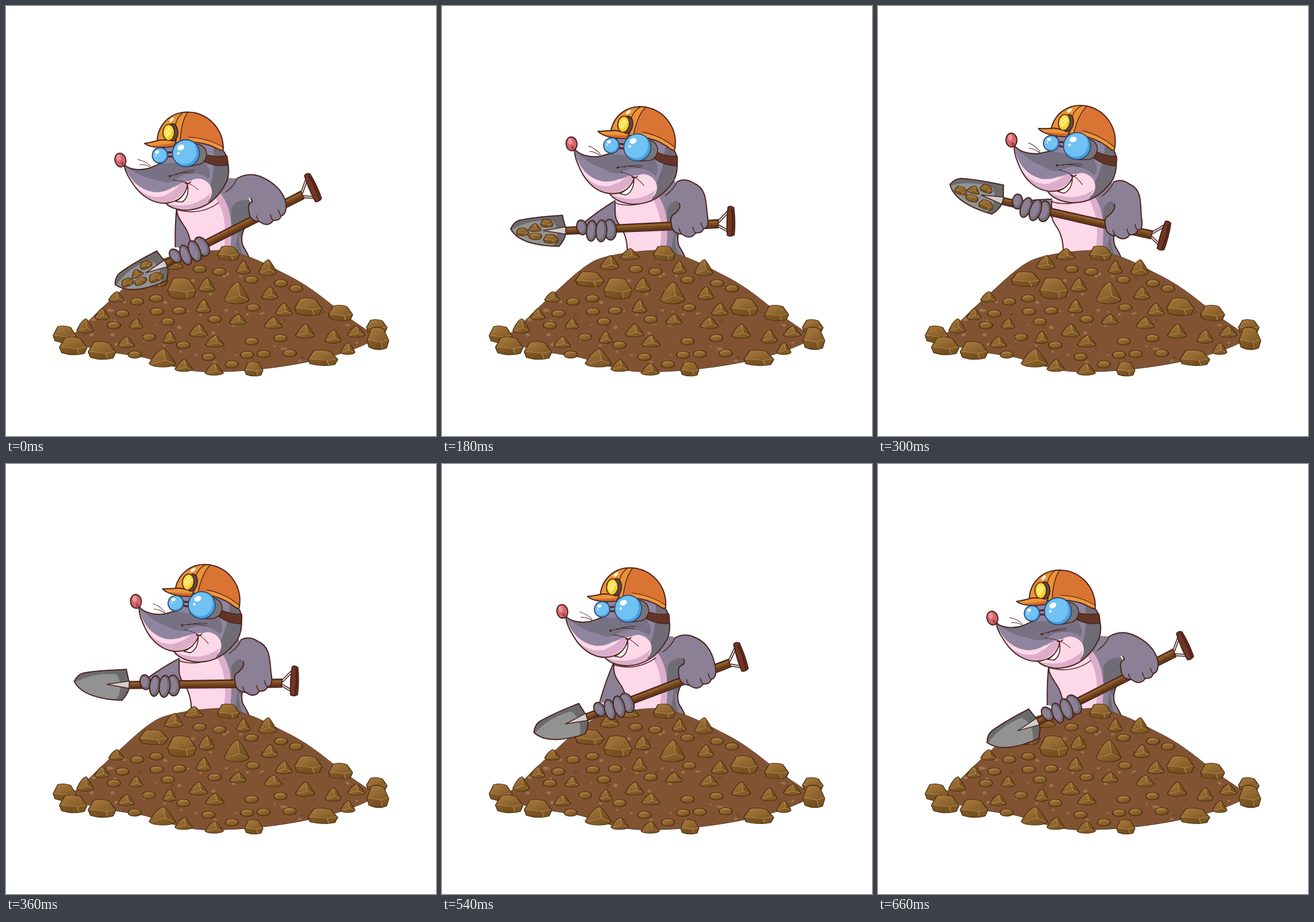
These frames come from a looping animation (748x748 px, 780 ms). An HTML page with a canvas:

```html
<!DOCTYPE html>
<html lang="en">
<head>
<meta charset="utf-8">
<title>Digging mole</title>
<style>
html, body { margin: 0; width: 100%; height: 100%; overflow: hidden; background: #fff; }
canvas { display: block; width: 748px; height: 748px; }
</style>
</head>
<body>
<canvas width="748" height="748"></canvas>
<script>
const ctx = document.querySelector('canvas').getContext('2d');
const LOOP = 780, STEP = 30, THROW = 300, REST = 660;
const INK = '#4b231c', FUR = '#8b8096', FUR_DARK = '#706c76', PINK = '#fdd8e9', PINK_DARK = '#dcaecb';

const lerp = (a, b, u) => a + (b - a) * u;

// 0 is the low digging pose, 1 the raised one: quick lift that slows down, then an even return
function lift(t) {
  if (t >= REST) return 0;
  if (t >= THROW) return 1 - (t - THROW) / (REST - THROW);
  if (t >= 180) return lerp(.81, 1, (t - 180) / 120);
  return t < 90 ? .6 * t / 90 : lerp(.6, .81, (t - 90) / 90);
}

// The dig turns into the throw at two thirds of the lift
const TURN = .66;
const via = (u, low, mid, high) =>
  u < TURN ? lerp(low, mid, u / TURN) : lerp(mid, high, (u - TURN) / (1 - TURN));

function pose(u) {
  return {
    x: via(u, 534, 506, 498),
    y: via(u, 316, 355, 400),
    angle: via(u, -24, -12, 15.6) * Math.PI / 180,
    slide: via(u, -10, 0, -5),
    arm: via(u, 0, .84, 1.08)
  };
}

function shape(d, fill, stroke, width = 2) {
  const p = new Path2D(d);
  if (fill) { ctx.fillStyle = fill; ctx.fill(p); }
  if (stroke) { ctx.strokeStyle = stroke; ctx.lineWidth = width; ctx.stroke(p); }
}

function oval(x, y, rx, ry, fill, stroke, tilt = 0, width = 2) {
  ctx.beginPath();
  ctx.ellipse(x, y, rx, ry, tilt, 0, 7);
  if (fill) { ctx.fillStyle = fill; ctx.fill(); }
  if (stroke) { ctx.strokeStyle = stroke; ctx.lineWidth = width; ctx.stroke(); }
}

function group(draw, clip) {
  ctx.save();
  if (clip) ctx.clip(new Path2D(clip));
  draw();
  ctx.restore();
}

// Stones are drawn in a unit box and scaled
const stoneFill = ctx.createLinearGradient(-.3, -.5, .3, .5);
stoneFill.addColorStop(0, '#a87a3d');
stoneFill.addColorStop(1, '#76501f');
const TENT = {
  body: 'M-.5 .3L-.32-.1Q-.08-.5 .05-.5Q.12-.48 .4 .08L.5 .32Q.4 .5 0 .5Q-.42 .5-.5 .3Z',
  dark: 'M.05-.5L.12 .12L.5 .32Q.44 .1 .4 .08Z',
  edge: 'M.04-.42L.12 .12L-.36 .3M.12 .12L.42 .3'
};
const BLOCK = {
  body: 'M-.5 .08L-.3-.44Q0-.54 .26-.4L.5 .1L.4 .42Q0 .58-.42 .38Z',
  dark: 'M-.5 .08L.14 .16L.2 .5Q-.1 .54-.42 .38Z',
  edge: 'M-.44 .06L.14 .16L.46 .06M.14 .16L.2 .46'
};
const PEBBLE = {
  body: 'M-.5 0C-.5-.66 .5-.66 .5 0C.5 .66-.5 .66-.5 0Z',
  dark: 'M-.4 .25C-.1 .5 .45 .4 .48-.1C.5 .7-.4 .6-.4 .25Z',
  edge: 'M-.3-.2Q0-.4 .3-.2'
};

function stone({ kind, x, y, w, h }) {
  group(() => {
    ctx.translate(x, y);
    ctx.scale(w, h);
    const px = 1 / Math.sqrt(w * h);
    shape(kind.body, stoneFill, '#493011', 1.3 * px);
    shape(kind.dark, 'rgba(92,55,15,.3)');
    shape(kind.edge, null, '#bd925a', .9 * px);
  });
}

const MOUND = 'M104 580C130 565 160 530 184 510C215 482 240 456 266 443C290 432 340 426 372 425' +
  'C420 430 450 448 485 466C535 490 565 520 590 538C615 556 630 564 645 578C610 598 570 610 520 620' +
  'C460 632 390 638 340 636C300 634 265 616 230 609C190 604 140 596 104 580Z';

let seed = 11;
const random = (from, to) => from + (seed = seed * 16807 % 2147483647) / 2147483647 * (to - from);

const speckles = Array.from({ length: 110 }, (_, i) => ({
  x: random(140, 610), y: random(450, 620), r: random(1.2, 3.2), color: i % 3 ? '#9d724d' : '#784a2c'
}));

// A few big stones, the rest scattered with a minimum distance
function scatter() {
  const place = (kind, x, y, w, h) => ({ kind, x, y, w, h });
  const stones = [
    place(BLOCK, 102, 571, 40, 30), place(BLOCK, 117, 591, 48, 32), place(BLOCK, 167, 599, 48, 32),
    place(BLOCK, 306, 491, 50, 38), place(BLOCK, 257, 475, 50, 27), place(BLOCK, 387, 430, 38, 26),
    place(BLOCK, 526, 523, 48, 32), place(BLOCK, 582, 534, 42, 28), place(BLOCK, 645, 557, 36, 24),
    place(BLOCK, 647, 578, 38, 40), place(BLOCK, 551, 612, 52, 28), place(BLOCK, 431, 631, 32, 26),
    place(TENT, 401, 499, 44, 38), place(TENT, 272, 612, 46, 32), place(TENT, 455, 455, 32, 28)
  ];
  const mound = new Path2D(MOUND);
  for (let i = 0; i < 1200 && stones.length < 64; i++) {
    const x = random(110, 645), y = random(424, 636), small = stones.length % 2;
    const free = stones.every(s => Math.hypot(s.x - x, (s.y - y) * 1.3) > s.w / 2 + 17);
    if (free && ctx.isPointInPath(mound, x, y))
      stones.push(small ? place(PEBBLE, x, y, 23, 13) : place(TENT, x, y, random(23, 34), random(17, 26)));
  }
  return stones;
}
const stones = scatter();

function drawMound() {
  shape(MOUND, '#825333', '#5e3a20', 1);
  group(() => speckles.forEach(s => oval(s.x, s.y, s.r * 1.3, s.r, s.color)), MOUND);
  stones.forEach(stone);
}

function handCenter({ x, y, angle, slide }) {
  const dx = slide - 232, dy = 16, c = Math.cos(angle), s = Math.sin(angle);
  return [x + dx * c - dy * s, y + dx * s + dy * c];
}

function drawBody(u, p) {
  const nx = 297 + 5 * u, ny = 354 - 14 * u;
  const [hx, hy] = handCenter(p), wx = hx - 25, wy = hy - 10;
  const sleeve = `M${nx} ${ny - 4}Q${(nx + wx) / 2 - 2} ${(ny + wy) / 2 - 4} ${wx} ${wy}`;
  shape(`${sleeve}L${hx + 24} ${hy + 4}L318 385L318 350Z`, FUR);
  shape(sleeve, null, INK);
  const chest = `M322 442C324 415 320 396 308 380C300 368 ${nx} 362 ${nx} ${ny}`;
  const side = '424 372C412 388 407 402 412 417C417 426 422 432 424 442';
  const torso = `${chest}L330 330L385 299L402 300L424 338L${side}Z`;
  shape(torso, FUR);
  group(() => {
    shape('M392 352C402 334 420 336 430 340L425 374Q412 388 409 404Q398 386 392 378Z', FUR_DARK);
    shape('M406 390Q402 412 414 440L400 440Q398 410 406 390Z', FUR_DARK);
    shape('M280 320L372 325C394 350 396 392 387 442L280 442Z', PINK_DARK);
    shape('M280 320L358 325C382 352 386 390 376 442L280 442Z', PINK);
  }, torso);
  shape(`${chest}M${side}`, null, INK);
  shape(`M${nx} ${ny}C325 ${ny + 8} 350 ${ny + 3} ${370 + 6 * u} ${ny - 12}`, null, INK, 1.5);
}

// Shovel space: level shovel with its grip at (502, 374)
function inShovel({ x, y, angle }, draw) {
  group(() => {
    ctx.translate(x, y);
    ctx.rotate(angle);
    ctx.translate(-502, -374);
    draw();
  });
}

const BLADE = 'M209 364C211 376 216 385 215 396C213 405 208 413 203 418C170 418 132 412 119 388' +
  'C122 381 128 375 134 373C160 367 185 366 209 364Z';

function drawShovel(loaded) {
  shape(BLADE, '#929292');
  group(() => {
    shape('M120 384L134 373L209 364L217 395L203 419L192 419C203 402 202 384 191 373C168 372 142 376 120 390Z', '#6b6b6c');
  }, BLADE);
  shape(BLADE, null, INK);
  if (loaded) {
    for (let i = 0; i < 3; i++)
      stone({ kind: i === 1 ? TENT : BLOCK, x: 140 + 21 * i, y: 393 - 7.5 * i, w: 22, h: 14 });
    stone({ kind: PEBBLE, x: 162, y: 401, w: 22, h: 12 });
    stone({ kind: BLOCK, x: 189, y: 405, w: 26, h: 16 });
  }
  shape('M176 391L215 384L216 397Z', '#d3cdd0', INK, 1.5);
  const prongs = 'M481 374L498 356M481 382L498 391';
  shape(prongs, null, INK, 5);
  shape(prongs, null, '#e4dde0', 2);
  shape('M215 385L464 372L480 371L480 385L464 386L215 397Z', '#77491f', INK);
  shape('M217 388L478 375', null, '#91602f', 3);
  shape('M217 394.5L478 382', null, '#5d3519', 2.5);
  shape('M497 349Q502 346 507 350Q510 374 508 397Q502 401 496 398Q494 374 497 349Z', '#713625', INK);
  shape('M504 353Q507 374 504 396', null, '#522315', 3);
}

function drawLeftHand() {
  const finger = (x, y, rx, ry, tilt) => {
    oval(x, y, rx, ry, FUR_DARK, INK, tilt);
    oval(x - 1.5, y - 1, rx - 3, ry - 4, FUR, null, tilt);
  };
  finger(245, 385, 9, 13, -.2);
  finger(294, 389, 11, 18, -.1);
  finger(262, 391, 9, 18, .08);
  finger(279, 391, 9.5, 19, .05);
}

function drawRightArm(u) {
  const at = (x0, y0, x1, y1) => [lerp(x0, x1, u), lerp(y0, y1, u)];
  const [sx, sy] = at(402, 300, 409, 306), [tx, ty] = at(441, 296, 438, 309);
  const [ex, ey] = at(487, 343, 461, 370), [hx, hy] = at(455, 358, 430, 381);
  const [px, py] = at(426, 335, 412, 344);
  const knuckles = `${hx + 24} ${hy + 7}q-3 9-14 8q-9 13-24 2q-17-1-18-16Q${hx - 36} ${hy - 14} ${hx - 27} ${hy - 18}`;
  const outline = `M${sx} ${sy}Q${(sx + tx) / 2} ${(sy + ty) / 2 - 9} ${tx} ${ty}` +
    `C${tx + 25} ${ty + 10} ${ex - 4} ${ey - 20} ${ex} ${ey}Q${ex + 2} ${ey + 18} ${knuckles}Q${px + 4} ${py + 8} ${px} ${py}`;
  shape(outline + 'L396 325Z', FUR);
  shape(outline, null, INK);
  for (const [dx, dy] of [[24, 7], [10, 15], [-14, 17]])
    shape(`M${hx + dx} ${hy + dy}q-4-3-5-10`, null, INK, 1.6);
  shape(`M${sx} ${sy}q-4 12-20 24`, null, INK, 1.5);
}

const HEAD = 'M207 277C214 284 232 287 250 282C258 279 264 275 272 273L276 245L345 235C365 235 382 250 385 268' +
  'C388 280 389 292 384 305C372 330 352 352 318 355C300 356 285 351 278 343C255 344 235 330 222 311C214 299 208 290 206 279Z';

function lens(x, y, r) {
  oval(x, y, r, r, '#64b8f0');
  group(() => {
    ctx.clip();
    oval(x + r * .3, y + r * .35, r, r, '#4a9fe0');
    oval(x - r * .12, y - r * .1, r * .9, r * .92, '#70c1f4');
  });
  oval(x, y, r, r, null, '#2f4a70', 0, 1.8);
  oval(x - r * .38, y - r * .42, r * .27, r * .2, '#fff', null, -.5);
  oval(x - r * .56, y + r * .02, r * .1, r * .1, '#e8f6ff');
}

function drawHelmet() {
  const dome = 'M263 240C262 208 284 185 316 184.5C350 185 378 212 378 249Q377 253 371 250C350 238 320 230 263 244Z';
  shape(dome, '#da7433');
  group(() => {
    shape('M255 250L255 180L316 184C308 196 304 212 303 236Z', '#ea9336');
    shape('M318 230Q350 230 380 246L380 254Q350 238 318 236Z', '#ef983d');
  }, dome);
  shape(dome, null, INK);
  shape('M316 185Q305 200 303 234M307 186Q297 194 295 206', null, INK, 1.4);
  shape('M318 228Q352 230 378 246', null, INK, 1.2);
  shape('M241 239C252 238 262 234 270 233L296 233L292 244C278 246 252 248 241 239Z', '#ec9538', INK);
  shape('M250 243Q272 242 292 238L291 243Q270 247 250 243Z', '#d06a2c');
  oval(290, 220, 9, 15, '#5c4b46', INK);
  oval(283, 220, 10, 14, '#f3cd29', INK, 0, 1.6);
  oval(281.5, 219, 6.5, 10, '#fae04a');
  shape('M277 222L286 211M279 227L289 214', null, '#fff6b8', 1.6);
  oval(288, 198, 5, 2.5, '#fff2d6', null, -.8);
}

function drawHead(u) {
  ctx.translate(379 + 33 * u, 251 + u * .5);
  ctx.rotate(u * 11.2 * Math.PI / 180);
  ctx.translate(-379, -251);
  shape('M229 267Q244 270 252 279M232 276Q244 275 252 281', null, INK, 1);
  shape(HEAD, '#9085a0');
  group(() => {
    shape('M210 280C235 290 252 282 272 274L345 270Q360 290 352 300C330 286 308 292 298 300C280 314 268 302 250 300Q232 296 210 280Z', '#777184');
    shape('M360 240Q368 300 340 350L400 350L400 240Z', FUR_DARK);
    shape('M206 279C214 300 232 322 262 324C288 323 300 306 322 304C335 294 360 305 358 325C357 340 340 352 318 358L270 358L206 330Z', PINK);
    shape('M225 314C245 336 282 338 304 308L317 306Q314 330 279 344Q250 346 225 314Z', PINK_DARK);
    shape('M279 343Q300 350 322 345Q345 338 356 324L350 350L300 360Z', PINK_DARK);
    shape('M214 297C230 324 262 336 292 314Q288 324 276 330C250 338 228 322 214 297Z', PINK);
  }, HEAD);
  shape(HEAD, null, INK);
  shape('M348 259Q368 264 384 260Q387 268 385 277Q366 280 346 271Z', '#633526', INK, 1.5);
  shape('M328 240Q346 240 349 256Q349 270 338 275L320 279Z', '#77757a', INK, 1.5);
  drawHelmet();
  shape('M279 255L293 254M280 262L292 262', null, INK, 3);
  lens(268, 260, 13.5);
  lens(313, 256, 23.5);
  shape('M316 309C315 328 300 341 278 343M312 308Q317 311 321 306', null, INK);
  shape('M316 313C318 326 314 337 306 341L295 340Q310 332 316 313Z', '#fff', INK, 1.6);
  oval(285, 296, 2, 2, INK);
  oval(292, 303, 1.2, 1.2, INK);
  oval(296, 293, 1.2, 1.2, INK);
  shape('M285 296Q305 288 326 290M296 293Q312 286 328 286M292 303Q318 304 335 320', null, INK, 1);
  oval(199, 268, 9.5, 12, '#d5666e', INK, -.25);
  oval(196, 264, 4, 5.5, '#eb949a', null, -.25);
  oval(202, 274, 2.6, 3, '#a83f4a');
}

function draw(t) {
  const u = lift(t), p = pose(u);
  ctx.fillStyle = '#fff';
  ctx.fillRect(0, 0, 748, 748);
  drawBody(u, p);
  drawMound();
  inShovel(p, () => {
    drawShovel(t <= THROW);
    ctx.translate(p.slide, 0);
    drawLeftHand();
  });
  drawRightArm(p.arm);
  group(() => drawHead(u));
}

ctx.lineJoin = ctx.lineCap = 'round';
function frame() {
  draw(Math.floor(performance.now() % LOOP / STEP) * STEP);
  requestAnimationFrame(frame);
}
frame();
</script>
</body>
</html>
```
